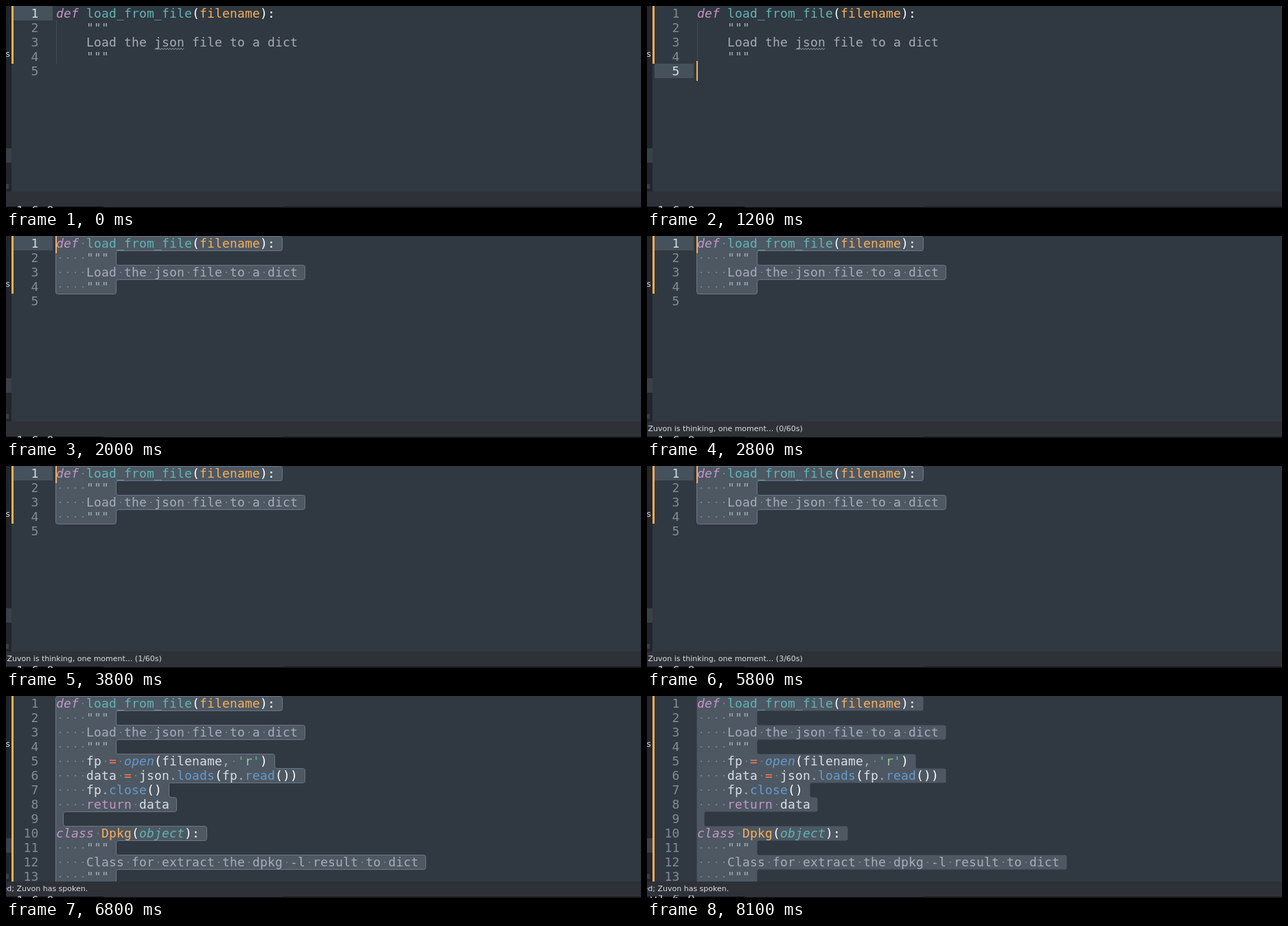
Recreate the animation shown at these times as an HTML page with a canvas. Size 925 by 294 pixels, loop 8200 ms.

```html
<!DOCTYPE html>
<html lang="en">
<head>
<meta charset="utf-8">
<title>Editor</title>
<style>
  html, body { margin: 0; width: 100%; height: 100%; overflow: hidden; background: #303841; }
  canvas { display: block; }
</style>
</head>
<body>
<canvas id="stage" width="925" height="294"></canvas>
<script>
const ctx = document.getElementById('stage').getContext('2d');
const LOOP = 8200;
const LEFT = 73, CELL = 11, ROW = 21, ASCENT = 17, EDITOR_H = 270;
const MONO = '18px "DejaVu Sans Mono", monospace';
const UI = '11px "DejaVu Sans", sans-serif';
const ORANGE = '#f9ae58';

// A capital letter marks an italic style
const COLORS = {
  k: '#c695c6', f: '#5fb4b4', w: '#ffffff', a: ORANGE, c: '#a6acb9',
  v: '#d8dee9', o: '#f97b58', b: '#6699cc', s: '#99c794'
};

const HEAD = [
  ['K', 'def '], ['f', 'load_from_file'], ['w', '('], ['a', 'filename'], ['w', '):']
];
const quotes = [['c', '    """']];
const SHORT = [HEAD, quotes, [['c', '    Load the json file to a dict']], quotes, []];
const FULL = [
  ...SHORT.slice(0, 4),
  [['v', '    fp '], ['o', '= '], ['B', 'open'], ['w', '('], ['v', 'filename'], ['c', ', '],
   ['f', "'"], ['s', 'r'], ['f', "'"], ['w', ')']],
  [['v', '    data '], ['o', '= '], ['v', 'json'], ['c', '.'], ['b', 'loads'], ['w', '('],
   ['v', 'fp'], ['c', '.'], ['b', 'read'], ['w', '())']],
  [['v', '    fp'], ['c', '.'], ['b', 'close'], ['w', '()']],
  [['k', '    return '], ['v', 'data']],
  [],
  [['K', 'class '], ['a', 'Dpkg'], ['w', '('], ['F', 'object'], ['w', '):']],
  quotes,
  [['c', '    Class for extract the dpkg -l result to dict']],
  quotes
];

// [start time, caret line, first selected line]
const STEPS = [
  [0, 1, 0], [1200, 5, 0], [1600, 4, 4], [1700, 3, 3],
  [1900, 2, 2], [2000, 1, 1], [6800, 0, 1]
];

const lineLength = line => line.reduce((n, token) => n + token[1].length, 0);

function rect(color, x, y, w, h) {
  ctx.fillStyle = color;
  ctx.fillRect(x, y, w, h);
}

function label(text, x, y, font, color) {
  ctx.font = font;
  ctx.fillStyle = color;
  ctx.fillText(text, x, y);
}

function drawCells(text, x, y, font, color) {
  [...text].forEach((ch, i) => {
    if (ch !== ' ') label(ch, x + i * CELL, y, font, color);
  });
}

function drawLine(line, y, selected) {
  let x = LEFT;
  for (const [style, text] of line) {
    const key = style.toLowerCase();
    const font = (style === key ? '' : 'italic ') + MONO;
    drawCells(text, x, y + ASCENT, font, COLORS[key]);
    if (selected) {
      [...text].forEach((ch, i) => {
        if (ch === ' ') rect('#727e89', x + i * CELL + 5, y + 10, 2, 2);
      });
    }
    x += text.length * CELL;
  }
}

// Outline around the selected rows, each reaching one cell past its text
function selectionPath(lines, first, last) {
  const left = LEFT - 0.5;
  const points = [[left, (first - 1) * ROW + 0.5]];
  for (let n = first; n <= last; n++) {
    const right = LEFT + (lineLength(lines[n - 1]) + 1) * CELL - 0.5;
    const end = n === 13 ? EDITOR_H + 9 : n * ROW + 0.5;
    points.push([right, (n - 1) * ROW + 0.5], [right, end]);
  }
  points.push([left, points[points.length - 1][1]]);
  const corners = points.filter((p, i) => {
    const a = points[(i + points.length - 1) % points.length];
    const b = points[(i + 1) % points.length];
    return !(a[0] === p[0] && b[0] === p[0]);
  });
  const path = new Path2D();
  path.moveTo((corners[0][0] + corners[1][0]) / 2, corners[0][1]);
  corners.forEach((_, i) => {
    const p = corners[(i + 1) % corners.length];
    const q = corners[(i + 2) % corners.length];
    path.arcTo(p[0], p[1], q[0], q[1], 3);
  });
  path.closePath();
  return path;
}

function drawSquiggle(x, end, y) {
  ctx.beginPath();
  for (let i = 0; x + i <= end; i += 2) ctx.lineTo(x + i, y + (i % 4 ? -1 : 1));
  ctx.strokeStyle = '#a6acb9';
  ctx.lineWidth = 1;
  ctx.stroke();
}

function drawSidebar(full) {
  rect('#22262b', 0, 0, 8, EDITOR_H);
  rect('#3a4047', 0, 207, 8, 21);
  rect('#3a4047', 0, 259, 4, 7);
  label('s', -0.5, 74, '12px "DejaVu Sans", sans-serif', '#d4d8dc');
  rect(ORANGE, 8, 0, 3, full ? EDITOR_H : 84);
}

function drawEditor(t) {
  const [, active, first] = STEPS.filter(step => step[0] <= t).pop();
  const full = t >= 6800;
  const lines = full ? FULL : SHORT;
  const last = full ? 13 : 4;

  ctx.save();
  ctx.beginPath();
  ctx.rect(0, 0, 925, EDITOR_H);
  ctx.clip();

  drawSidebar(full);
  if (active) rect('#45515b', 11, (active - 1) * ROW, 57, ROW);
  lines.forEach((_, i) => {
    const n = String(i + 1);
    const color = i + 1 === active ? '#d8dce2' : '#848b95';
    drawCells(n, 48 - n.length * CELL - 0.5, i * ROW + ASCENT, MONO, color);
  });

  if (!full) rect('#414a53', 73, ROW, 1, 3 * ROW);
  const path = first ? selectionPath(lines, first, last) : null;
  if (path) {
    ctx.fillStyle = '#4d5863';
    ctx.fill(path);
  }
  lines.forEach((line, i) => {
    drawLine(line, i * ROW, first && i + 1 >= first && i + 1 <= last);
  });
  if (!first) drawSquiggle(217, 260, 62.5);
  if (path && t < 8000) {
    ctx.strokeStyle = '#6a7885';
    ctx.lineWidth = 1;
    ctx.stroke(path);
  }
  if (active && t >= 1200) rect(ORANGE, 72, (active - 1) * ROW - 4, 2, 29);
  if (t >= 6600 && t < 6800) {
    rect('#ffffff', 95, 0, 3, 1);
    rect('#ffffff', 96, 1, 2, 1);
  }
  ctx.restore();
}

function drawStatus(t) {
  rect('#2e3138', 0, EDITOR_H, 925, 22);
  if (t >= 6800) {
    label('ed; Zuvon has spoken.', -5.5, 284, UI, '#dcdfe0');
  } else if (t >= 2800) {
    const seconds = Math.min(3, Math.floor((t - 2800) / 1000));
    label(`Zuvon is thinking, one moment... (${seconds}/60s)`, 1.5, 284, UI, '#dcdfe0');
  }
}

// Sliver of the window below
function drawEdge(t) {
  rect('#08090a', 0, 292, 925, 2);
  rect('#292b2e', 142, 292, 261, 1);
  rect('#16181b', 403, 292, 522, 2);
  ctx.save();
  ctx.beginPath();
  ctx.rect(0, 290, 76, 4);
  ctx.clip();
  drawCells('v1.6.0', 4, t >= 8000 ? 302 : 304, MONO, '#b9bcbf');
  ctx.restore();
}

function draw(now) {
  const t = now % LOOP;
  rect('#303841', 0, 0, 925, 294);
  drawEditor(t);
  drawStatus(t);
  drawEdge(t);
}

const start = performance.now();
function tick() {
  draw(performance.now() - start);
  requestAnimationFrame(tick);
}
tick();
</script>
</body>
</html>
```
